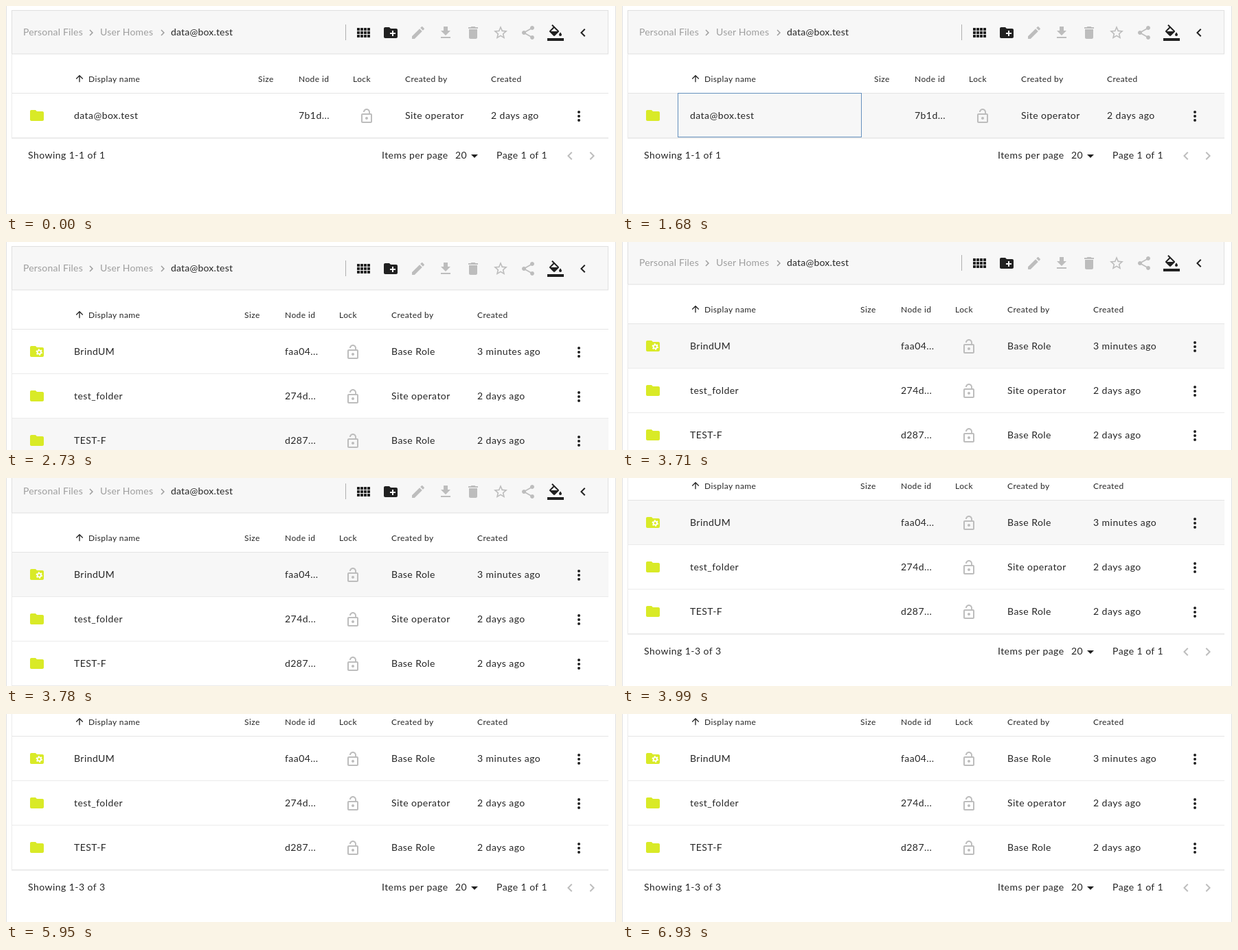
Recreate the animation shown at these times as an HTML page. Size 888 by 304 pixels, loop 7490 ms.

```html
<!DOCTYPE html>
<html lang="en">
<head>
<meta charset="utf-8">
<title>File list</title>
<style>
  html, body { margin: 0; width: 100%; height: 100%; overflow: hidden; background: #fff; }
  svg { display: block; }
  text { font: 14px Lato, "Open Sans", sans-serif; letter-spacing: .45px; fill: #262626; white-space: pre; }
  .crumb { letter-spacing: .2px; }
  .head { font-size: 12px; letter-spacing: .42px; }
  .faded { fill: #9e9e9e; }
</style>
</head>
<body>
<svg id="stage" width="888" height="304" viewBox="0 0 888 304"></svg>
<script>
const DARK = '#212121', GREY = '#bdbdbd', LIME = '#d9ea27', LINE = '#e4e4e4', PALE_LINE = '#ebebeb', SHADE = '#f7f7f7';
const LOOP = 7490, STEP = 70, ROW = 65, TOP = 128;

const ICONS = {
  grid: 'M3 9h4V5H3zm0 5h4v-4H3zm5 0h4v-4H8zm5 0h4v-4h-4zM8 9h4V5H8zm5-4v4h4V5zm5 9h4v-4h-4zM3 19h4v-4H3zm5 0h4v-4H8zm5 0h4v-4h-4zm5 0h4v-4h-4zm0-14v4h4V5z',
  newFolder: 'M20 6h-8l-2-2H4c-1.11 0-1.99.89-1.99 2L2 18c0 1.11.89 2 2 2h16c1.11 0 2-.89 2-2V8c0-1.11-.89-2-2-2zm-1 8h-3v3h-2v-3h-3v-2h3V9h2v3h3v2z',
  edit: 'M3 17.25V21h3.75L17.81 9.94l-3.75-3.75L3 17.25zM20.71 7.04c.39-.39.39-1.02 0-1.41l-2.34-2.34c-.39-.39-1.02-.39-1.41 0l-1.83 1.83 3.75 3.75 1.83-1.83z',
  download: 'M19 9h-4V3H9v6H5l7 7 7-7zM5 18v2h14v-2H5z',
  trash: 'M6 19c0 1.1.9 2 2 2h8c1.1 0 2-.9 2-2V7H6v12zM19 4h-3.5l-1-1h-5l-1 1H5v2h14V4z',
  star: 'M22 9.24l-7.19-.62L12 2 9.19 8.63 2 9.24l5.46 4.73L5.82 21 12 17.27 18.18 21l-1.63-7.03L22 9.24zM12 15.4l-3.76 2.27 1-4.28-3.32-2.88 4.38-.38L12 6.1l1.71 4.04 4.38.38-3.32 2.88 1 4.28L12 15.4z',
  share: 'M18 16.08c-.76 0-1.44.3-1.96.77L8.91 12.7c.05-.23.09-.46.09-.7s-.04-.47-.09-.7l7.05-4.11c.54.5 1.25.81 2.04.81 1.66 0 3-1.34 3-3s-1.34-3-3-3-3 1.34-3 3c0 .24.04.47.09.7L8.04 9.81C7.5 9.31 6.79 9 6 9c-1.66 0-3 1.34-3 3s1.34 3 3 3c.79 0 1.5-.31 2.04-.81l7.12 4.16c-.05.21-.08.43-.08.65 0 1.61 1.31 2.92 2.92 2.92s2.92-1.31 2.92-2.92-1.31-2.92-2.92-2.92z',
  fill: 'M16.56 8.94L7.62 0 6.21 1.41l2.38 2.38-5.15 5.15c-.59.59-.59 1.54 0 2.12l5.5 5.5c.29.29.68.44 1.06.44s.77-.15 1.06-.44l5.5-5.5c.59-.58.59-1.53 0-2.12zM5.21 10L10 5.21 14.79 10H5.21zM19 11.5s-2 2.17-2 3.5c0 1.1.9 2 2 2s2-.9 2-2c0-1.33-2-3.5-2-3.5zM0 20h24v4H0z',
  left: 'M15.41 7.41L14 6l-6 6 6 6 1.41-1.41L10.83 12z',
  right: 'M10 6L8.59 7.41 13.17 12l-4.58 4.58L10 18l6-6z',
  up: 'M4 12l1.41 1.41L11 7.83V20h2V7.83l5.58 5.59L20 12l-8-8-8 8z',
  folder: 'M10 4H4c-1.1 0-1.99.9-1.99 2L2 18c0 1.1.9 2 2 2h16c1.1 0 2-.9 2-2V8c0-1.1-.9-2-2-2h-8l-2-2z',
  lock: 'M12 17c1.1 0 2-.9 2-2s-.9-2-2-2-2 .9-2 2 .9 2 2 2zm6-9h-1V6c0-2.76-2.24-5-5-5S7 3.24 7 6h1.9c0-1.71 1.39-3.1 3.1-3.1s3.1 1.39 3.1 3.1v2H6c-1.1 0-2 .9-2 2v10c0 1.1.9 2 2 2h12c1.1 0 2-.9 2-2V10c0-1.1-.9-2-2-2zm0 12H6V10h12v10z',
  more: 'M12 8a2 2 0 100-4 2 2 0 000 4zm0 2a2 2 0 100 4 2 2 0 000-4zm0 6a2 2 0 100 4 2 2 0 000-4z'
};

// Icons are placed by their centre
const icon = (name, x, y, color = DARK, scale = 1) =>
  `<path d="${ICONS[name]}" fill="${color}" transform="translate(${x} ${y}) scale(${scale}) translate(-12 -12)"/>`;
const text = (x, y, content, cls = '') => `<text x="${x}" y="${y}" class="${cls}">${content}</text>`;
const rect = (x, y, w, h, color, extra = '') =>
  `<rect x="${x}" y="${y}" width="${w}" height="${h}" fill="${color}" ${extra}/>`;

const gear = (x, y) => `<g fill="none" stroke="#fff" transform="translate(${x} ${y})">
  <circle r="2.6" stroke-width="1.8"/><circle r="4" stroke-width="1.6" stroke-dasharray="2.1 2.09"/></g>`;

function toolbar() {
  const tools = [['grid', DARK], ['newFolder', DARK], ['edit', GREY], ['download', GREY], ['trash', GREY],
    ['star', GREY], ['share', GREY], ['fill', DARK], ['left', DARK]];
  return rect(8.5, 6.5, 868, 63.5, SHADE, 'stroke="#e0e0e0"') +
    text(25, 43, 'Personal Files', 'crumb faded') + icon('right', 124, 39, '#9e9e9e', .75) +
    text(137, 43, 'User Homes', 'crumb faded') + icon('right', 228, 39, '#9e9e9e', .75) +
    text(240, 43, 'data@box.test', 'crumb') + rect(494, 27, 1, 23, '#b0b0b0') +
    tools.map(([name, color], i) => icon(name, 520 + i * 40, 39, color)).join('');
}

function row([name, node, author, created, smart], i, shift) {
  const y = TOP + i * ROW, base = y + 37;
  return rect(9, y, 868, ROW - 1, SHADE, 'class="hover"') + rect(9, y + ROW - 1, 868, 1, PALE_LINE) +
    icon('folder', 45, y + 32, LIME) + (smart ? gear(48.3, y + 33) : '') +
    text(99, base, name) + text(426 - shift, base, node) + icon('lock', 525 - shift, y + 33, GREY) +
    text(581 - shift, base, author) + text(706 - shift, base, created) + icon('more', 834, y + 33);
}

function listing(id, rows, shift) {
  const n = rows.length, bottom = TOP + n * ROW, base = bottom + 30;
  const heads = [[367, 'Size'], [426, 'Node id'], [505, 'Lock'], [581, 'Created by'], [706, 'Created']];
  return `<g id="${id}">` + rect(8, 70, 1, bottom - 70, PALE_LINE) + rect(9, TOP - 1, 868, 1, LINE) +
    icon('up', 107, 106, DARK, .65) + text(120, 111, 'Display name', 'head') +
    heads.map(([x, label]) => text(x - shift, 111, label, 'head')).join('') +
    rows.map((r, i) => row(r, i, shift)).join('') + rect(8, bottom, 869, 1, PALE_LINE) +
    text(32, base, `Showing 1-${n} of ${n}`) + text(547, base, 'Items per page') + text(654, base, '20') +
    `<path d="M677 ${base - 6}h10l-5 5z" fill="${DARK}"/>` + text(714, base, 'Page 1 of 1') +
    icon('left', 821, base - 4, GREY) + icon('right', 853, base - 4, GREY) + '</g>';
}

const $ = id => document.getElementById(id);
$('stage').innerHTML = '<g id="page">' + toolbar() +
  listing('parent', [['data@box.test', '7b1d...', 'Site operator', '2 days ago']], 0) +
  listing('child', [
    ['BrindUM', 'faa04...', 'Base Role', '3 minutes ago', true],
    ['test_folder', '274d...', 'Site operator', '2 days ago'],
    ['TEST-F', 'd287...', 'Base Role', '2 days ago']
  ], 20) +
  rect(81.5, 127.5, 267, 64, 'none', 'id="focus" stroke="#6490bd"') + '</g>' +
  rect(0, 0, 1, 304, '#e0e0e0') + rect(887, 0, 1, 304, '#e0e0e0');

const hovers = document.querySelectorAll('.hover');
const ramp = (t, from, to) => Math.min(1, Math.max(0, (t - from) / (to - from)));
const show = (id, on) => $(id).setAttribute('visibility', on ? 'visible' : 'hidden');
const scrollSteps = [[0, 0], [3710, 8], [3780, 19], [3920, 60], [3990, 95]];

function draw(now) {
  const t = Math.floor(now % LOOP / STEP) * STEP;
  const opened = t >= 2170;
  show('parent', !opened);
  show('child', opened);
  show('focus', t >= 1260 && !opened);

  const moveUp = ramp(t, 3080, 3430);
  const levels = [
    ramp(t, 700, 1050),
    1 - ramp(t, 2170, 2450) + moveUp - ramp(t, 5320, 5670),
    0,
    ramp(t, 2450, 2730) - moveUp
  ];
  hovers.forEach((el, i) => el.setAttribute('opacity', levels[i]));

  const offset = scrollSteps.filter(([at]) => at <= t).pop()[1];
  $('page').setAttribute('transform', `translate(0 ${-offset})`);
  requestAnimationFrame(draw);
}
requestAnimationFrame(draw);
</script>
</body>
</html>
```
